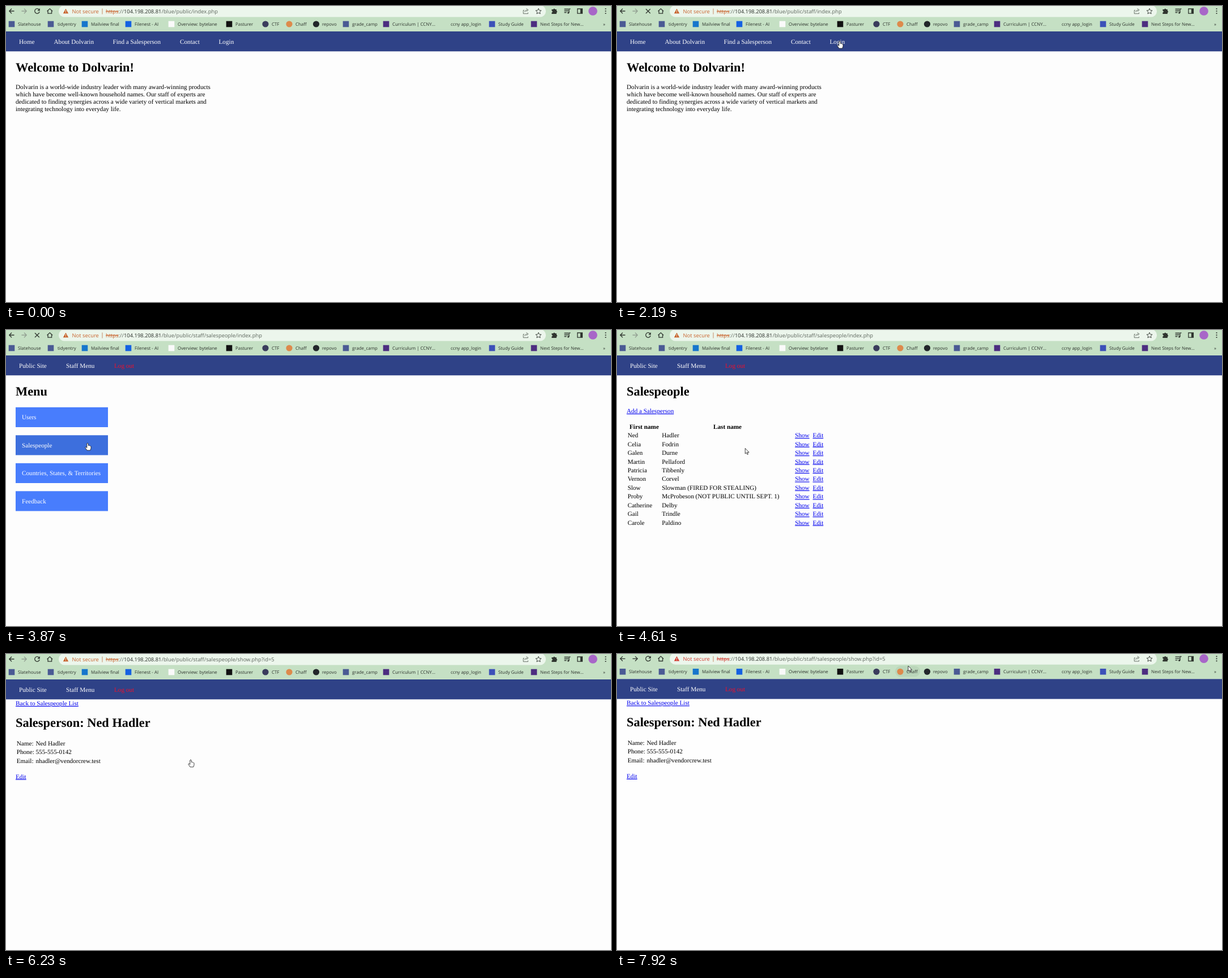
An HTML page for the animation above (7.99 s loop, 1068 by 524 pixels).

```html
<!DOCTYPE html>
<html lang="en">
<head>
<meta charset="utf-8">
<title>Staff site walkthrough</title>
<style>
html, body { margin: 0; width: 100%; height: 100%; overflow: hidden; background: #fdfdfd; }
svg { display: block; width: 100vw; height: 100vh; }
text { font: 11.2px "Liberation Serif", "Times New Roman", serif; fill: #000; white-space: pre; text-rendering: geometricPrecision; }
.h1 { font-size: 22.4px; font-weight: bold; }
.th { font-weight: bold; }
.nav { fill: #fff; }
.out { fill: #f0102c; }
.link { fill: #0000ee; text-decoration: underline; }
.mark { font: 7.9px "Open Sans", "Noto Sans", sans-serif; fill: #2c322c; }
.url { font: 9.38px "Open Sans", "Noto Sans", sans-serif; fill: #5d665d; }
.host { fill: #2a2f2a; }
.warn { fill: var(--warn); }
.strike { text-decoration: line-through; }
.line { fill: none; stroke: #2f352f; stroke-width: 1.3; }
#scene { --warn: #c8622c; }
</style>
</head>
<body>
<svg id="stage" viewBox="0 0 1068 524" preserveAspectRatio="none"></svg>
<script>
const LOOP = 7990;
const stage = document.getElementById('stage');

const text = (x, y, s, cls = '') => `<text x="${x}" y="${y}" class="${cls}">${s}</text>`;
const rect = (x, y, w, h, fill, rx = 0, id = '') =>
  `<rect x="${x}" y="${y}" width="${w}" height="${h}" fill="${fill}" rx="${rx}" id="${id}"/>`;
const disc = (x, y, r, fill) => `<circle cx="${x}" cy="${y}" r="${r}" fill="${fill}"/>`;
const line = (d, extra = '') => `<path class="line" d="${d}" ${extra}/>`;
const group = (id, body) => `<g id="${id}">${body}</g>`;

// Bookmark: text x, label, icon x, icon colour, round icon
const marks = [
  [21, 'Slatehouse', 10, '#4a5a94'],
  [91, 'tidyentry', 79, '#4a5a94'],
  [150, 'Mailview final', 139, '#1676cc'],
  [227, 'Filenest - AI', 216, '#1461e2'],
  [303, 'Overview: bytelane', 292, '#fafafa'],
  [405, 'Pasturer', 394, '#111'],
  [469, 'CTF', 458, '#3a3c5c', 1],
  [511, 'Chaff', 500, '#dd8a4c', 1],
  [558, 'repovo', 547.5, '#22262a', 1],
  [611, 'grade_camp', 600, '#4a5a94'],
  [682, 'Curriculum | CCNY…', 671, '#4c2d80'],
  [785, 'ccny app_login'],
  [869, 'Study Guide', 858, '#3c50b8'],
  [943, 'Next Steps for New…', 932, '#4c2d80']
];

function bookmarks() {
  return marks.map(([x, label, ix, color, round]) =>
    (ix ? (round ? disc(ix, 32, 5.6, color) : rect(ix - 5.3, 26.7, 10.6, 10.6, color)) : '') +
    text(x, 35, label, 'mark')).join('') + text(1054, 35, '»', 'mark th');
}

function toolbar() {
  return rect(0, 0, 1068, 45, '#c5e0c4') +
    rect(93, -1, 860, 20.5, '#ecf6ec', 10) +
    line('M14.5 9H6M10 4.8L5.8 9L10 13.2') +
    line('M27.5 9H36M32 4.8L36.2 9L32 13.2', 'id="forward"') +
    group('reload', line('M58.6 6.6A4.3 4.3 0 1 0 59.2 10') +
      '<path d="M59.8 4V8.4H55.4Z" fill="#2f352f"/>') +
    group('stop', line('M51 5.2L58.8 13M58.8 5.2L51 13')) +
    line('M72.5 9.2L77.3 4.8L82.1 9.2M74 8.2V13.2H80.6V8.2') +
    '<path class="warn" d="M105.5 4.8L110.2 13.2H100.8Z"/>' +
    rect(105, 7.6, 1, 2.6, '#ecf6ec') + rect(105, 11, 1, 1, '#ecf6ec') +
    text(116.5, 13, 'Not secure', 'url warn') +
    rect(169.5, 4.5, 1, 10, '#c58a63') +
    `<text x="176" y="13" class="url"><tspan class="warn strike">https</tspan>://<tspan class="host">104.198.208.81</tspan><tspan id="path"></tspan></text>` +
    line('M915 7.5H913.2V13.6H921.4V11.5M915.6 11Q916 7.2 920 7M918.4 4.4L922 7L918.4 9.8', 'style="stroke-width:.9;stroke:#5c655c"') +
    line('M940 4.4L941.4 7.6L945 8L942.3 10.3L943.1 13.8L940 12L936.9 13.8L937.7 10.3L935 8L938.6 7.6Z', 'style="stroke-width:.9"') +
    '<path fill="#2f352f" d="M963.3 6H966.2A1.6 1.6 0 0 1 969.3 6H971.8V8.6A1.6 1.6 0 0 1 971.8 11.7V14H963.3V11.4A1.4 1.4 0 0 0 963.3 8.6Z"/>' +
    line('M985.5 5.5H993M985.5 8.5H993M985.5 11.5H989.5M994 12V5.2H996.5') + disc(992.6, 12, 1.6, '#2f352f') +
    line('M1008.8 5H1017.4V13.2H1008.8Z') + rect(1013.8, 5, 3.6, 8.2, '#2f352f') +
    disc(1036, 9, 7.8, '#a866c8') +
    [5, 9, 13].map(y => disc(1058.5, y, 1.1, '#2f352f')).join('') +
    rect(491, 22, 44, 19, '#bad6ba', 9.5, 'hover') +
    bookmarks();
}

const navItems = items => items.map(([x, s, cls = 'nav']) => text(x, 67, s, cls)).join('');

function homePage() {
  const lines = [
    'Dolvarin is a world-wide industry leader with many award-winning products',
    'which have become well-known household names. Our staff of experts are',
    'dedicated to finding synergies across a wide variety of vertical markets and',
    'integrating technology into everyday life.'
  ];
  return navItems([[23, 'Home'], [84.5, 'About Dolvarin'], [188.5, 'Find a Salesperson'], [307, 'Contact'], [375.5, 'Login']]) +
    text(17, 116, 'Welcome to Dolvarin!', 'h1') +
    lines.map((s, i) => text(17, 146.8 + 12.9 * i, s)).join('');
}

function menuPage() {
  const items = ['Users', 'Salespeople', 'Countries, States, &amp; Territories', 'Feedback'];
  return text(17, 116, 'Menu', 'h1') + items.map((s, i) =>
    rect(17, 136.8 + 49.5 * i, 163, 35.2, '#487dfd', 0, 'button' + i) +
    text(28, 158.2 + 49.5 * i, s, 'nav')).join('');
}

function listPage() {
  const people = [
    'Ned|Hadler', 'Celia|Fodrin', 'Galen|Durne', 'Martin|Pellaford', 'Patricia|Tibbenly', 'Vernon|Corvel',
    'Slow|Slowman (FIRED FOR STEALING)', 'Proby|McProbeson (NOT PUBLIC UNTIL SEPT. 1)',
    'Catherine|Delby', 'Gail|Trindle', 'Carole|Paldino'
  ];
  return text(17, 116, 'Salespeople', 'h1') + text(17, 147, 'Add a Salesperson', 'link') +
    text(22, 174.5, 'First name', 'th') + text(170, 174.5, 'Last name', 'th') +
    people.map((p, i) => {
      const y = 190.2 + 15.45 * i, [first, last] = p.split('|');
      return text(18.7, y, first) + text(79.2, y, last) + text(314.2, y, 'Show', 'link') + text(345.6, y, 'Edit', 'link');
    }).join('');
}

function detailPage() {
  const rows = [['Name:', 'Ned Hadler'], ['Phone:', '555-555-0142'], ['Email:', 'nhadler@vendorcrew.test']];
  return text(17, 91, 'Back to Salespeople List', 'link') +
    text(17, 129, 'Salesperson: Ned Hadler', 'h1') +
    rows.map(([k, v], i) => text(18.7, 161.7 + 15.45 * i, k) + text(52.5, 161.7 + 15.45 * i, v)).join('') +
    text(17, 220.6, 'Edit', 'link');
}

stage.innerHTML = rect(0, 0, 1068, 524, '#fdfdfd', 0, 'paper') +
  group('scene', toolbar() + rect(0, 45, 1068, 35.3, '#2f4287') +
    group('staffNav', navItems([[23, 'Public Site'], [106, 'Staff Menu'], [191, 'Log out', 'out']])) +
    group('home', homePage()) + group('menu', menuPage()) +
    group('list', listPage()) + group('detail', detailPage())) +
  group('cursor', '<g fill="#fff" stroke="#111" stroke-width=".8" stroke-linejoin="round">' +
    '<path id="arrow" d="M0 0V9.6L2.2 7.6L3.7 11L5.3 10.3L3.8 7.1H6.8Z"/>' +
    '<path id="hand" d="M-1.2 1Q0-.8 1.2 1V4.4Q2.4 3.6 3.1 4.8Q4.2 4.2 4.8 5.4Q5.8 5.2 6 6.6V9.5L4.8 13H-1L-4 8.4Q-4.2 6.8-2.9 7.1L-1.2 8.5Z"/></g>');

const el = id => document.getElementById(id);
const show = (id, on) => { el(id).style.display = on ? '' : 'none'; };

// Value of the last step that has begun
const at = (steps, t) => steps.reduce((v, [start, next]) => t >= start ? next : v, steps[0][1]);

const pages = [[0, 'home'], [2260, 'menu'], [4010, 'list'], [6170, 'detail']];
const paths = [
  [0, '/blue/public/index.php'],
  [1730, '/blue/public/staff/index.php'],
  [3870, '/blue/public/staff/salespeople/index.php'],
  [6170, '/blue/public/staff/salespeople/show.php?id=5']
];
const loading = [[0, false], [1730, true], [2330, false], [3480, true], [4080, false], [5700, true], [6230, false]];
const pointer = [[0, ''], [260, 'arrow'], [1390, 'hand'], [2260, 'arrow'], [3120, 'hand'], [4010, 'arrow'], [5210, 'hand'], [7220, 'arrow']];

// Cursor moves: start, end, number of steps, evenly timed way points
const moves = [
  [260, 1030, 12, [[906, 458], [860, 410], [740, 300], [580, 165], [465, 82], [428, 63]]],
  [1120, 1530, 7, [[428, 63], [410, 54], [396, 58], [393, 62]]],
  [2580, 3190, 10, [[393, 64], [372, 85], [320, 120], [245, 158], [186, 181], [155, 197]]],
  [3340, 3620, 4, [[155, 197], [144, 200]]],
  [4330, 5080, 12, [[144, 200], [170, 208], [223, 209], [262, 214], [290, 206], [306, 196]]],
  [5150, 5280, 3, [[306, 196], [323, 190]]],
  [5560, 5840, 5, [[323, 190], [328, 187], [326, 187]]],
  [7220, 7920, 11, [[560, 237], [548, 190], [530, 110], [517, 50], [514, 21]]]
];

function cursorAt(t) {
  const [start, end, n, pts] = moves.filter(m => t >= m[0]).pop() || moves[0];
  const step = Math.floor((t - start + 10) / ((end - start) / (n - 1)));
  const p = Math.max(0, Math.min(1, (step + 1) / n)) * (pts.length - 1);
  const i = Math.min(pts.length - 2, Math.floor(p));
  return [0, 1].map(k => pts[i][k] + (pts[i + 1][k] - pts[i][k]) * (p - i));
}

function draw(t) {
  const page = at(pages, t), busy = at(loading, t), kind = at(pointer, t), resumed = t >= 7220;
  pages.forEach(([, id]) => show(id, id === page));
  show('staffNav', page !== 'home');
  show('stop', busy);
  show('reload', !busy);
  show('hover', t >= 7850);
  show('arrow', kind === 'arrow');
  show('hand', kind === 'hand');
  el('path').textContent = at(paths, t);
  el('button1').setAttribute('fill', t >= 3120 ? '#3d6fdd' : '#487dfd');
  el('forward').style.stroke = resumed ? '#2f352f' : '#929f92';
  el('paper').setAttribute('fill', resumed ? '#fefefe' : '#fdfdfd');
  el('scene').style.setProperty('--warn', resumed ? '#d2392f' : '#c8622c');
  el('scene').setAttribute('transform', `translate(0 ${resumed ? -0.7 : 0})`);
  el('cursor').setAttribute('transform', `translate(${cursorAt(t).join(' ')})`);
}

const begin = performance.now();
function tick() {
  draw((performance.now() - begin) % LOOP);
  requestAnimationFrame(tick);
}
draw(0);
requestAnimationFrame(tick);
</script>
</body>
</html>
```
